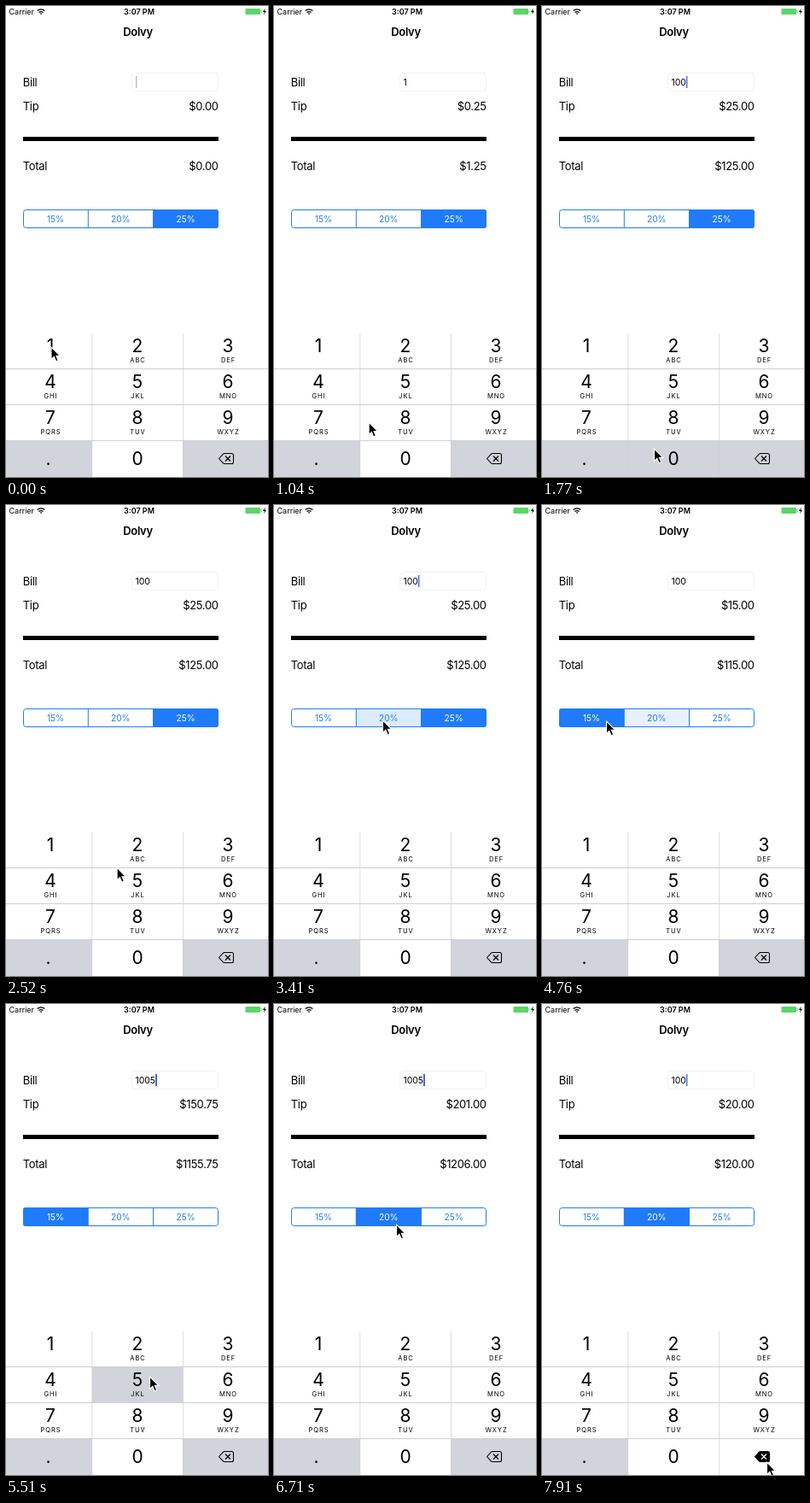
An HTML page for the animation above (8 s loop, 307x551 px).

```html
<!DOCTYPE html>
<html lang="en">
<head>
<meta charset="utf-8">
<title>Tip calculator</title>
<style>
  html, body { margin: 0; height: 100%; overflow: hidden; background: #fff; }
  svg { display: block; width: 100%; height: 100%; font-family: Inter, Roboto, sans-serif; }
</style>
</head>
<body>
<svg id="stage" viewBox="0 0 307 551"></svg>
<script>
const LOOP = 8000;
const BLUE = '#1f7bfa', GREY = '#d1d4da', LINE = '#cfcfd2';
const COLUMNS = [[0, 101, 52], [101, 106, 154], [207, 100, 260]]; // left, width, label centre
const ROWS = [383, 425, 467, 509];
const LETTERS = ['', 'ABC', 'DEF', 'GHI', 'JKL', 'MNO', 'PQRS', 'TUV', 'WXYZ'];
const RATES = [15, 20, 25];
const SEGMENT_X = [20, 96, 172.5, 249];

// Each timeline lists [step, value]; a value holds until the next entry.
const BILL = [[0, ''], [2, '1'], [9, '10'], [12, '100'], [37, '1005'], [53, '100']];
const PRESSED = [[0, ''], [1, '1'], [4, ''], [8, '0'], [10, ''], [11, '0'], [13, ''],
  [36, '5'], [39, ''], [52, 'del']];
const SELECTED = [[0, 2], [24, 1], [31, 0], [44, 1]];
const TOUCHED = [[0, -1], [21, 1], [24, -1], [30, 0], [31, -1], [43, 1], [44, -1]];
const CARET = [[0, .45], [1, 1], [6, 0], [9, 1], [16, 0], [20, 1], [24, 0], [27, 1],
  [30, 0], [34, 1], [41, 0], [44, 1], [48, 0], [51, 1]];
// Pointer moves: first step, last step, destination.
const MOVES = [[5, 8, 131.5, 518], [15, 20, 127.5, 252], [24, 29, 75.5, 253],
  [32, 36, 168.5, 436], [38, 43, 143.5, 258], [45, 50, 235, 532], [50, 51, 263.5, 536]];

const valueAt = (timeline, step) => timeline.filter(([start]) => start <= step).pop()[1];

const rect = (x, y, w, h, fill, extra = '') =>
  `<rect x="${x}" y="${y}" width="${w}" height="${h}" fill="${fill}" ${extra}/>`;

const text = (x, y, size, label, { anchor = 'start', fill = '#000', weight = 400, spacing = 0 } = {}) =>
  `<text x="${x}" y="${y}" font-size="${size}" text-anchor="${anchor}" fill="${fill}"
    font-weight="${weight}" letter-spacing="${spacing}">${label}</text>`;

function pointerAt(step) {
  let x = 53, y = 399;
  for (const [start, end, toX, toY] of MOVES) {
    const p = Math.min(1, Math.max(0, (step - start) / (end - start)));
    const eased = p * p * (3 - 2 * p);
    x += (toX - x) * eased;
    y += (toY - y) * eased;
  }
  return [x, y];
}

function statusBar() {
  const arc = (r, y) => `<path d="M${41 - r} ${y}q${r} ${-r * .8} ${2 * r} 0" fill="none" stroke="#000" stroke-width="1.3"/>`;
  return text(3.5, 10, 9, 'Carrier') + arc(4.4, 5.6) + arc(2.6, 7.6) +
    '<path d="M39.6 8.6h2.8L41 10.2z"/>' +
    text(156, 10, 9, '3:07 PM', { anchor: 'middle', weight: 600 }) +
    rect(280.5, 3, 17.5, 7, '#5bd568', 'rx="1"') + rect(298.6, 5, 1, 3, '#5bd568') +
    '<path d="M304 2.5l-3 4.5h2l-1 3.5 3-4.7h-2z"/>' +
    text(154.5, 35, 13, 'Dolvy', { anchor: 'middle', weight: 600, spacing: -.3 });
}

function form(step) {
  const bill = valueAt(BILL, step);
  const tip = bill * RATES[valueAt(SELECTED, step)] / 100;
  const caretX = [152, 158, 164, 169, 175][bill.length];
  const label = (y, name) => text(19.8, y, 13, name, { spacing: -.35 });
  const amount = (y, value) => text(248.6, y, 13, '$' + value.toFixed(2), { anchor: 'end', spacing: -.35 });
  return label(94, 'Bill') + label(122, 'Tip') + label(192, 'Total') +
    rect(147.5, 78.5, 101, 21, '#fff', 'rx="4" stroke="#f1f1f1"') +
    text(151.5, 92.6, 10.5, bill, { spacing: -.1 }) +
    rect(caretX, 82, bill.length === 4 ? 2 : 1.4, 14, '#4467ee', `opacity="${valueAt(CARET, step)}"`) +
    amount(122, tip) + amount(192, +bill + tip) +
    rect(20, 153, 229, 5, '#000');
}

function segments(step) {
  const selected = valueAt(SELECTED, step), touched = valueAt(TOUCHED, step);
  let out = '<clipPath id="round"><rect x="20" y="238" width="229" height="22" rx="3"/></clipPath><g clip-path="url(#round)">';
  RATES.forEach((rate, i) => {
    const x = SEGMENT_X[i], width = SEGMENT_X[i + 1] - x;
    const fading = step === 32 && i === 1;
    const opacity = i === selected ? 1 : i === touched ? .15 : fading ? .1 : 0;
    out += rect(x, 238, width, 22, BLUE, `opacity="${opacity}"`) +
      text(x + width / 2, 252.7, 10.2, rate + '%', { anchor: 'middle', fill: i === selected ? '#fff' : BLUE });
  });
  return out + '</g>' + rect(95.8, 238, 1, 22, BLUE) + rect(172, 238, 1, 22, BLUE) +
    rect(20.5, 238.5, 228, 21, 'none', `rx="3" stroke="${BLUE}"`);
}

function keypad(step) {
  const pressed = valueAt(PRESSED, step);
  const names = ['1', '2', '3', '4', '5', '6', '7', '8', '9', '.', '0', 'del'];
  let keys = '', labels = '';
  names.forEach((name, i) => {
    const [left, width, centre] = COLUMNS[i % 3], top = ROWS[i / 3 | 0];
    const special = name === '.' || name === 'del';
    keys += rect(left, top, width, 42, special !== (name === pressed) ? GREY : '#fff');
    if (name === 'del') {
      labels += deleteIcon(name === pressed);
    } else {
      labels += text(name === '.' ? 49.5 : centre, i < 9 ? top + 22 : 537, 21, name, { anchor: 'middle' });
    }
    if (LETTERS[i]) labels += text(centre + .5, top + 34, 7.6, LETTERS[i], { anchor: 'middle', spacing: .9 });
  });
  const rules = [424, 466, 508].map(y => rect(0, y, 307, 1, LINE)).join('') +
    [100.5, 207].map(x => rect(x, 383, .7, 168, LINE)).join('');
  return keys + rules + labels;
}

function deleteIcon(filled) {
  return `<path d="M249.5 529.5l5-5.4q.6-.6 1.4-.6h8.6q2 0 2 2v8q0 2-2 2h-8.6q-.8 0-1.4-.6z"
      fill="${filled ? '#000' : 'none'}" stroke="#000" stroke-width="1.1" stroke-linejoin="round"/>
    <path d="M257 526.5l6 6m0-6l-6 6" stroke="${filled ? '#fff' : '#000'}" stroke-width="1.2"/>`;
}

function pointer(step) {
  return `<path transform="translate(${pointerAt(step)})" d="M0 0V14.3L3.3 11.3 5.6 16.8 8.2 15.7 5.9 10.4H10.4Z"
    fill="#000" stroke="#fff" stroke-width="1.1"/>`;
}

const stage = document.getElementById('stage');
let shownStep = -1;

function draw() {
  const t = performance.now() % LOOP;
  // The screen refreshes about every 150 ms, slightly faster at first.
  const step = Math.floor((t + Math.min(40, t / 55)) / 150);
  if (step !== shownStep) {
    stage.innerHTML = statusBar() + form(step) + segments(step) + keypad(step) + pointer(step);
    shownStep = step;
  }
  requestAnimationFrame(draw);
}
draw();
</script>
</body>
</html>
```
